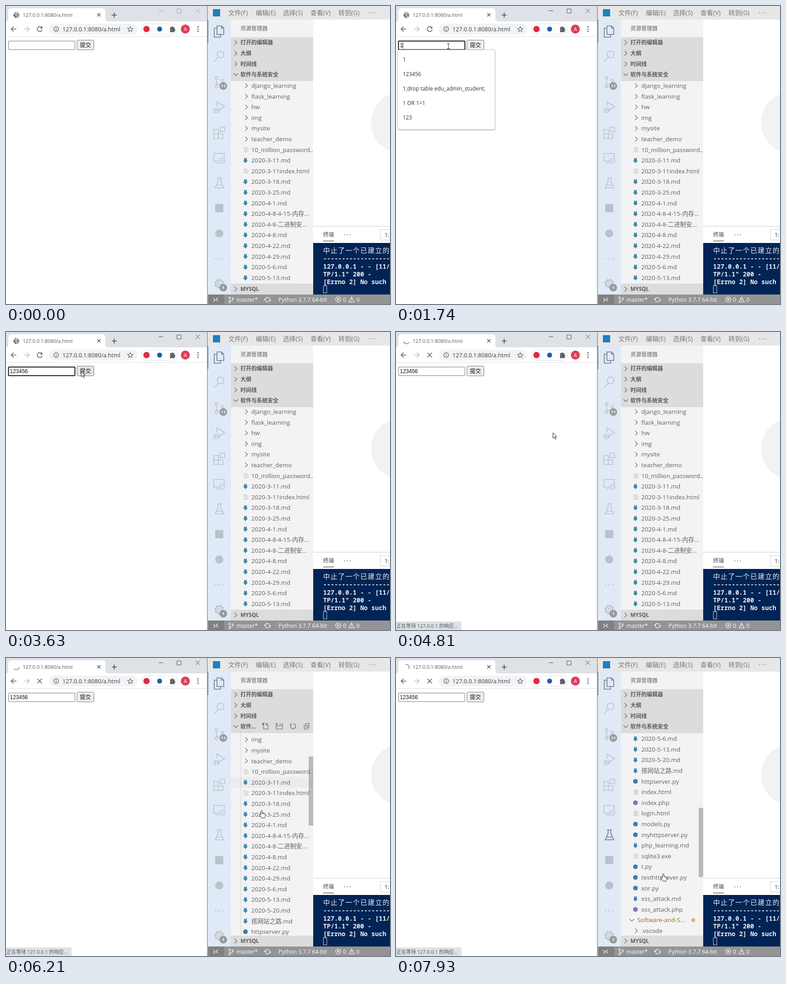
These frames come from a looping animation (850x659 px, 8 s). An HTML page:

```html
<!DOCTYPE html>
<html lang="zh">
<head>
<meta charset="utf-8">
<style>
  html, body { margin: 0; width: 100%; height: 100%; overflow: hidden; background: #fff }
  svg { display: block; font-family: "Open Sans", "Noto Sans CJK SC", "Noto Sans CJK", sans-serif }
  .mono { font-family: "Noto Sans Mono", "Noto Sans CJK SC", "Noto Sans CJK", monospace; font-weight: 600 }
  .arial { font-family: "Liberation Sans", sans-serif }
</style>
</head>
<body>
<svg id="stage" width="850" height="659" viewBox="0 0 850 659"></svg>
<script>
const LOOP = 8000, ROW = 23.6, NOTCH = 66.5, LIST_TOP = 164.4;

// Markup helpers; text is placed by its left edge and vertical centre.
const text = (x, y, s, size, fill = '#616161', more = '') =>
  `<text x="${x}" y="${y + size * .36}" font-size="${size}" fill="${fill}" ${more}>${s}</text>`;
const rect = (x, y, w, h, fill, more = '') =>
  `<rect x="${x}" y="${y}" width="${w}" height="${h}" fill="${fill}" ${more}/>`;
const disc = (x, y, r, fill, more = '') => `<circle cx="${x}" cy="${y}" r="${r}" fill="${fill}" ${more}/>`;
const line = (d, stroke, width = 1.3, more = '') =>
  `<path d="${d}" fill="none" stroke="${stroke}" stroke-width="${width}" ${more}/>`;
const right = (x, y) => line(`M${x - 2.5} ${y - 5}l5 5-5 5`, '#616161', 1.2);
const down = (x, y) => line(`M${x - 5} ${y - 2.5}l5 5 5-5`, '#616161', 1.2);
const badge = (x, y, s) => disc(x, y, 8.5, '#9a9a9a') + text(x, y, s, 9.5, '#fff', 'text-anchor="middle" font-weight="700"');

function browser() {
  const ink = '#5f6368';
  return rect(0, 0, 446, 659, '#fff') + rect(0, 0, 446, 34, '#dee1e6') +
    `<path d="M0 34q5 0 5-6V12q0-7 7-7H213q7 0 7 7V28q0 6 6 6Z" fill="#fff"/>` +
    `<g id="globe">${disc(23, 20, 6.3, ink)}${line('M18 17l4 1 1 3-3 2M23 14l1 3 4 0M24 26l1-4 3-1', '#fff', 1.5)}</g>` +
    disc(23, 20, 6, 'none', 'id="spinner" stroke="#8b8f94" stroke-width="1.7" stroke-dasharray="15 30"') +
    text(37, 20, '127.0.0.1:8080/a.html', 10.9, '#55585c') +
    line('M202 16l7 7m0-7l-7 7', '#45484c', 1.4) + line('M234 20h11M239.5 14.5v11', '#45484c', 1.7) +
    `<g id="controls" fill="none">
      <path d="M338 10.5h10M378.500 6.500h9v9h-9ZM420 6l9 9m0-9l-9 9"/></g>` +
    line('M23 51H12m5-5.500l-5.500 5.500 5.500 5.500', ink, 1.7) +
    line('M40 51h11m-5-5.500l5.500 5.500-5.500 5.500', '#bfc2c6', 1.7) +
    `<g id="reload">${line('M79 47.500a5.500 5.500 0 1 0 1 5', ink, 1.7)}<path d="M80.500 45v5h-5Z" fill="${ink}"/></g>` +
    line('M69.500 46l10 10m0-10l-10 10', ink, 1.7, 'id="stop"') +
    rect(95, 39, 196, 24, '#f1f3f4', 'rx="12"') +
    disc(111, 51, 5.3, 'none', `stroke="${ink}" stroke-width="1.3"`) + line('M111 50v4M111 47.500v1.500', ink, 1.4) +
    text(125, 51, '127.0.0.1:8080/a.html', 12.65, '#3a3d41') +
    line('M275 45.500l1.700 3.800 4.100.4-3.100 2.700.9 4-3.600-2.100-3.600 2.100.9-4-3.100-2.700 4.100-.4Z', ink, 1.2) +
    rect(299.5, 39.5, 81, 23, '#fff', 'rx="11.5" stroke="#dfe1e5"') +
    disc(311, 51, 7, '#dd2c44') + disc(340, 51, 5.5, '#1d5fa8') +
    `<path d="M363 47h3a2 2 0 1 1 4 0h3v4a2 2 0 1 1 0 4v3h-4a2 2 0 0 0-3 0h-3v-4a2 2 0 0 0 0-3Z" fill="${ink}"/>` +
    disc(397, 51, 10, '#dd405a') + text(397, 51, 'A', 11, '#fff', 'text-anchor="middle"') +
    [46, 51, 56].map(y => disc(425, y, 1.5, ink)).join('') +
    rect(0, 67, 446, 1, '#dcdee1') +
    rect(5.5, 77.5, 147, 19, '#fff', 'id="field" rx="1.5"') +
    text(8.5, 87, '', 12, '#111', 'id="value" class="arial"') +
    rect(8, 80, 1, 14, '#111', 'id="caret"') +
    rect(157, 75.5, 37.5, 21.5, '#efefef', 'id="button" rx="2" stroke="#767676"') +
    text(163.5, 86.5, '提交', 12.3, '#111') +
    `<g id="popup"><rect id="popupBox" x="4" y="97" rx="3" fill="#fff" stroke="#cfcfcf" style="filter:drop-shadow(0 1px 1px #0005)"/><g id="options"></g></g>` +
    `<g id="status"><path d="M0 640H142q3 0 3 3V659H0Z" fill="#dee1e6"/>${text(1, 650, '正在等待 127.0.0.1 的响应...', 10.8, '#505357')}</g>`;
}

function activityBar() {
  const ink = '#b9c2cc';
  return rect(447, 30, 51, 608, '#e0eaf7') + rect(446, 31, 2, 51, '#8a9098') +
    line('M467 44h10l5 5v14h-15ZM477 44v5h5M467 49h-6v20h14v-6', '#6d7784', 1.6) +
    disc(475, 107, 7.5, 'none', `stroke="${ink}" stroke-width="1.7"`) + line('M470 113l-9 10', ink, 1.8) +
    [[466, 159], [466, 178], [479, 165]].map(([x, y]) => disc(x, y, 3, 'none', `stroke="${ink}" stroke-width="1.6"`)).join('') +
    line('M466 162v13M479 168q0 5-6 5h-3q-4 0-4 3', ink, 1.6) + badge(481, 177, '11') +
    line('M467 222v-10l17 10-13 9', ink, 1.7) + disc(466, 231, 4.500, 'none', `stroke="${ink}" stroke-width="1.6"`) +
    line('M460 226l3 2m-4 3h14m-13 6l3-2m9-9l-3 2m3 7l-3-2', ink, 1.3) +
    line('M460 273h10v20h-10ZM460 283h20v10h-20ZM474 268h10v10h-10Z', ink, 1.7) +
    line('M474 343h-14v-17h23v10M464 347h9', ink, 1.7) + disc(479, 342, 5.5, '#e0eaf7', `stroke="${ink}" stroke-width="1.5"`) +
    line('M477 340l2 2-2 2m5-4l-2 2 2 2', ink, 1) +
    line('M467 380h11M469.500 380v8l-6.500 14h19l-6.500-14v-8M466 396h13', ink, 1.7, 'id="flask"') +
    rect(463, 438, 18, 18, ink) + disc(472, 503, 9, ink) +
    [464, 472, 480].map(x => disc(x, 559, 1.4, ink)).join('') +
    disc(472, 614, 8.500, 'none', `stroke="${ink}" stroke-width="4.500" stroke-dasharray="4 2.670"`) +
    disc(472, 614, 7.500, 'none', `stroke="${ink}" stroke-width="1.8"`) + disc(472, 614, 3, 'none', `stroke="${ink}" stroke-width="1.6"`) +
    badge(481, 623, '1');
}

const days = list => list.split(' ').map(d => `2020-${d}.md`);
const files = [
  'django_learning/', 'flask_learning/', 'hw/', 'img/', 'mysite/', 'teacher_demo/', '10_million_password...',
  ...days('3-11'), '2020-3-11index.html', ...days('3-18 3-25 4-1'), '2020-4-8-4-15-内存...', '2020-4-8-二进制安...',
  ...days('4-8 4-22 4-29 5-6 5-13 5-20'), '搭网站之路.md', 'httpserver.py', 'index.html', 'index.php', 'login.html',
  'models.py', 'myhttpserver.py', 'php_learning.md', 'sqlite3.exe', 't.py', 'testhttpsever.py', 'xor.py',
  'xss_attack.md', 'xss_attack.php', 'Software-and-S...', '.vscode/'
];

function fileRow(name, i) {
  const y = 176.2 + i * ROW;
  if (name.startsWith('Soft')) return down(522, y) + text(534, y, name, 13.4, '#9a6a1c') + disc(658, y, 4.3, '#dfb070');
  const icon = name.endsWith('/') ? right(532, y)
    : name.endsWith('.py') ? disc(530, y, 5.2, '#3c80a8')
    : name.endsWith('.php') ? disc(530, y, 5.2, '#8d6fb5')
    : /\.md$|^2020.*\.\.\.$/.test(name) ? `<path transform="translate(530 ${y})" d="M-3-6L0-4 3-6V0H5.500L0 6-5.500 0H-3Z" fill="#3f86ac"/>`
    : line(`M526 ${y - 4.500}h8m-8 3h11m-11 3h9m-9 3h11`, '#b0b4b8', 1.1);
  return icon + text(543, y, name.replace('/', ''), 13.4);
}

function explorer() {
  const heads = ['打开的编辑器', '大纲', '时间线'];
  const bold = 'font-weight="700"';
  return rect(498, 30, 182, 608, '#f3f3f3') + text(519, 50, '资源管理器', 12) +
    `<g clip-path="url(#listClip)">
      ${rect(498, 0, 182, ROW, '#ebeced', 'id="hoverRow"')}
      <g id="files">${files.map(fileRow).join('')}</g>
      ${rect(519.5, 164, 1, 450, '#cfcfcf', 'id="guide"')}
      ${rect(670, 195, 10, 153, '#646464', 'id="thumb" fill-opacity=".4"')}</g>` +
    rect(498, 164, 182, 2, '#0000001a') + rect(498, 69, 182, 95, '#dbdcdc') +
    heads.map((s, i) => right(508.5, 81 + i * ROW) + text(519, 81 + i * ROW, s, 12, '#5b5b5b', bold)).join('') +
    down(508.5, 151.5) + text(519, 151.8, '', 12, '#5b5b5b', `${bold} id="root"`) +
    `<g id="actions">` +
      line('M573 144h-3v13h10v-9l-4-4v4h4M569 143v6m-3-3h6', '#616161', 1.1) +
      line('M598 149v8h14v-11h-7M598 150h14M599 143v6m-3-3h6', '#616161', 1.1) +
      line('M631 147a5.800 5.800 0 1 0 5-2M630 144v4h4', '#616161', 1.2) +
      line('M660 149h8v8h-8ZM662 153h4M663 149v-4h8v8h-3', '#616161', 1.1) + `</g>` +
    rect(498, 614, 182, 24, '#dbdcdc') + right(508.5, 626) + text(519, 626, 'MYSQL', 11.8, '#5b5b5b', bold);
}

function editor() {
  const menu = ['文件(F)', '编辑(E)', '选择(S)', '查看(V)', '转到(G)'];
  const output = ['-'.repeat(19), '127.0.0.1 - - [11/', 'TP/1.1" 200 -', '[Errno 2] No such '];
  return rect(447, 0, 403, 30, '#e7e7e7') + rect(458, 7, 16, 16, '#1c7fc2') +
    menu.map((s, i) => text([492, 553, 613, 674, 736][i], 15, s, 14, '#777')).join('') +
    [805, 811, 817].map(x => disc(x, 15, 1, '#777')).join('') +
    rect(680, 30, 170, 608, '#fff') + disc(876, 258, 68, '#f2f2f2') +
    rect(680, 486.5, 170, 1, '#c9c9c9') +
    text(702, 506, '终端', 12, '#424242') + rect(702, 519, 24, 1.2, '#424242') +
    [750, 756, 762].map(x => disc(x, 506, 1, '#616161')).join('') +
    rect(828.5, 494.5, 30, 23, '#fff', 'stroke="#cecece"') + text(838, 506, '1:', 12.5, '#333') +
    rect(680, 524, 170, 114, '#012456') +
    text(702, 541, '中止了一个已建立的', 15, '#eee', 'letter-spacing="1.45" style="font-family:\'Noto Serif\',\'Noto Sans CJK SC\',serif"') +
    output.map((s, i) => text(702, 558.5 + i * 17.2, s, 13.7, '#f0f0f0', 'class="mono"')).join('') +
    rect(702.5, 618.5, 7.5, 16, 'none', 'stroke="#ddd"');
}

function statusBar() {
  const white = '#fff';
  return rect(447, 638, 403, 21, '#949494') + rect(447, 638, 36, 21, '#808080') +
    line('M459 646l4 4-4 4m10-9l-4 4 4 4', white, 1.2) +
    [[495, 645], [495, 655], [502, 647]].map(([x, y]) => disc(x, y, 1.8, 'none', 'stroke="#fff" stroke-width="1.1"')).join('') +
    line('M495 647v6M502 649q0 3-6 3', white, 1.1) + text(510, 649.5, 'master*', 12.3, white) +
    line('M573.500 649a5.300 5.300 0 0 1 10-1.500M584.500 650a5.300 5.300 0 0 1-10 1.500M571.500 648l2 2 2-2M582.500 651l2-2 2 2', white, 1.2) +
    text(603, 649.5, 'Python 3.7.7 64-bit', 12.3, white) +
    disc(735.5, 649, 5.8, 'none', 'stroke="#fff" stroke-width="1.1"') + line('M733 646.500l5 5m0-5l-5 5', white, 1.1) + text(746, 649.5, '0', 12.3, white) +
    line('M765 643.500l6 11h-12ZM765 647v4m0 1v1.200', white, 1.1) + text(775.5, 649.5, '0', 12.3, white);
}

const stage = document.getElementById('stage');
stage.innerHTML = `<clipPath id="listClip">${rect(498, 164, 182, 450, '#000')}</clipPath>` +
  browser() + explorer() + activityBar() + editor() + statusBar() +
  rect(445, 0, 1.5, 659, '#8c8c8c') + '<path id="mouse" stroke-linejoin="round"/>';
const el = {};
stage.querySelectorAll('[id]').forEach(node => el[node.id] = node);

const set = (node, attrs) => { for (const k in attrs) node.setAttribute(k, attrs[k]); };
const show = (node, on) => node.style.display = on ? '' : 'none';

const track = [
  [70, 478, 650], [220, 440, 520], [400, 300, 300], [560, 170, 130], [680, 116, 89], [3330, 116, 89],
  [3480, 140, 92], [3630, 166.5, 87], [4180, 168, 88], [4500, 250, 150], [4810, 346.5, 222.5], [4900, 430, 250],
  [4970, 540, 275], [5050, 640, 300], [5150, 740, 325], [5350, 825, 345], [5800, 825, 345], [5900, 800, 350],
  [6000, 680, 345], [6130, 565.5, 337], [6600, 566, 338], [6900, 573.5, 385], [7240, 573.5, 385], [7500, 591, 477]
];
function pointer(t) {
  const i = track.findIndex(p => p[0] > t);
  if (i < 0) return track[track.length - 1].slice(1);
  if (!i) return track[0].slice(1);
  const [a, b] = [track[i - 1], track[i]], k = (t - a[0]) / (b[0] - a[0]);
  return [a[1] + (b[1] - a[1]) * k, a[2] + (b[2] - a[2]) * k];
}

const cursors = {
  arrow: ['M0 0V12l2.800-2.600L5 14.200l1.900-.9-2.100-4.500H8.500Z', '#fff'],
  hand: ['M0 .5q2-1 2 1v5l5 1.200q1.800.5 1.600 2.500l-.8 4-1.200 2.300H.5L-4 10.500q-1-2 .8-2L-1 9.500V1.500Q-1 .5 0 .5Z', '#fff'],
  beam: ['M-3-5.500H-.5L0-5 .5-5.500H3M0-5V5M-3 5.500H3', 'none']
};

const CLICK_FIELD = 810, OPEN = 900, SUBMIT = 3760, LEAVE = 7860;
const keys = [1740, 1910, 2040, 2370, 2690, 2910];
const notches = [6190, 6600, 6950, 7260, 7360, 7460];
const history = ['1', '123456', '1;drop table edu_admin_student;', '1 OR 1=1', '123', "';drop table edu_admin_student;--"];
const passed = (times, t) => times.filter(x => x <= t).length;
const scrollAt = t => passed(notches, t) * NOTCH;

function drawForm(t) {
  const typed = passed(keys, t), value = '123456'.slice(0, typed);
  const focused = t >= CLICK_FIELD && t < SUBMIT;
  const lastInput = typed ? keys[typed - 1] : 860;
  set(el.controls, { stroke: t < CLICK_FIELD ? '#a3a6aa' : '#4a4d50' });
  set(el.field, { stroke: focused ? '#111' : '#767676', 'stroke-width': focused ? 2 : 1 });
  el.value.textContent = value;
  set(el.caret, { x: 8 + 6.67 * typed });
  show(el.caret, focused && Math.floor((t - lastInput) / 500) % 2 == 0);
  set(el.button, { fill: t > 3560 && t < 4230 ? '#e5e5e5' : '#efefef' });

  const matches = history.filter(s => s.startsWith(value));
  show(el.popup, t >= OPEN && typed < 6);
  set(el.popup, { opacity: Math.min(1, (t - OPEN) / 130) });
  set(el.popupBox, { width: [215, 172, 172, 172, 172, 172][typed - 1] || 236, height: 32 * matches.length + 16 });
  if (el.options.dataset.value !== value) {
    el.options.dataset.value = value;
    el.options.innerHTML = matches.map((s, i) => text(15, 119 + 32 * i, s, 11.85, '#333')).join('');
  }

  const loading = t >= SUBMIT;
  show(el.globe, !loading);
  show(el.reload, !loading);
  show(el.spinner, loading);
  show(el.stop, loading);
  show(el.status, t >= 4400);
  set(el.spinner, { transform: `rotate(${23 - 360 * (t - 4810) / 1320} 23 20)` });
}

function drawExplorer(t, x, y) {
  const inside = x > 498 && x < 680 && t > 4900 && t < LEAVE;
  const scroll = scrollAt(t);
  set(el.files, { transform: `translate(0 ${-scroll})` });
  // The highlighted row lags a moment behind each wheel step.
  const row = Math.floor((y - LIST_TOP + scrollAt(t - 100)) / ROW);
  set(el.hoverRow, { y: LIST_TOP + row * ROW - scroll });
  set(el.thumb, { y: 195 + scroll * .342 });
  show(el.hoverRow, inside);
  show(el.guide, inside);
  show(el.actions, inside);
  show(el.thumb, inside || t >= LEAVE);
  el.root.textContent = inside ? '软件...' : '软件与系统安全';
  set(el.flask, { stroke: t >= LEAVE ? '#6d7784' : '#b9c2cc' });
}

function drawMouse(t, x, y) {
  const overField = x > 5 && x < 152 && y > 77 && y < 97;
  const [d, fill] = cursors[overField ? 'beam' : x > 447 && x < 680 ? 'hand' : 'arrow'];
  set(el.mouse, { d, fill, stroke: '#222', transform: `translate(${x} ${y})` });
  show(el.mouse, t >= 70);
}

function frame() {
  const t = performance.now() % LOOP, [x, y] = pointer(t);
  drawForm(t);
  drawExplorer(t, x, y);
  drawMouse(t, x, y);
  requestAnimationFrame(frame);
}
frame();
</script>
</body>
</html>
```
